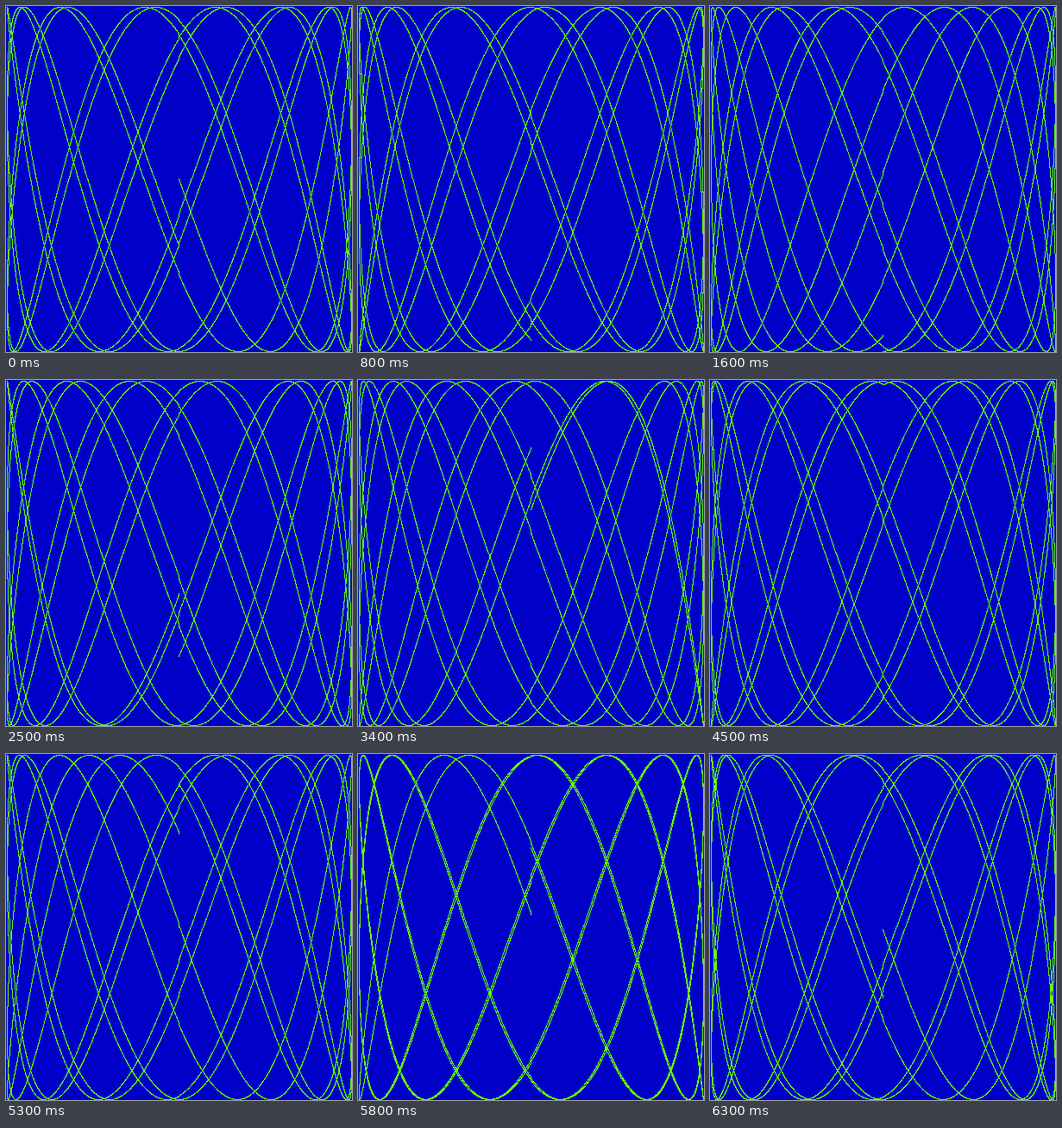
An HTML page with a canvas that plays this animation: 401x401 px, repeating every 6.4 s.

```html
<!DOCTYPE html>
<html lang="en">
<head>
<meta charset="utf-8">
<title>Lissajous</title>
<style>
  html, body { margin: 0; width: 100%; height: 100%; overflow: hidden; background: #0000c8; }
  canvas { display: block; width: 401px; height: 401px; }
</style>
</head>
<body>
<canvas id="stage" width="401" height="401"></canvas>
<script>
const SIZE = 200, SIDE = 2 * SIZE + 1;
const STEPS = 64, STEP_MS = 100;
const CYCLES = 5, RES = 0.001;
const FREQ = 2.81302;        // vertical to horizontal frequency
const PHASE_STEP = 0.1;

const ctx = document.getElementById('stage').getContext('2d');
const image = ctx.createImageData(SIDE, SIDE);
const pixels = new Uint32Array(image.data.buffer);

// Packed as ABGR
const BACK = 0xffc80000, LINE = 0xff00ff64;

// Truncating toward zero leaves the small kinks along both axes
const toPixel = v => SIZE + Math.trunc(v * SIZE + 0.5);

function draw(phase) {
  pixels.fill(BACK);
  for (let t = 0; t < CYCLES * 2 * Math.PI; t += RES) {
    const x = toPixel(Math.sin(t));
    const y = toPixel(Math.sin(t * FREQ + phase));
    pixels[y * SIDE + x] = LINE;
  }
  ctx.putImageData(image, 0, 0);
}

const start = performance.now();
let shown = -1;

function tick() {
  const step = Math.floor((performance.now() - start) / STEP_MS) % STEPS;
  if (step !== shown) {
    shown = step;
    draw(step * PHASE_STEP);
  }
  requestAnimationFrame(tick);
}
tick();
</script>
</body>
</html>
```
